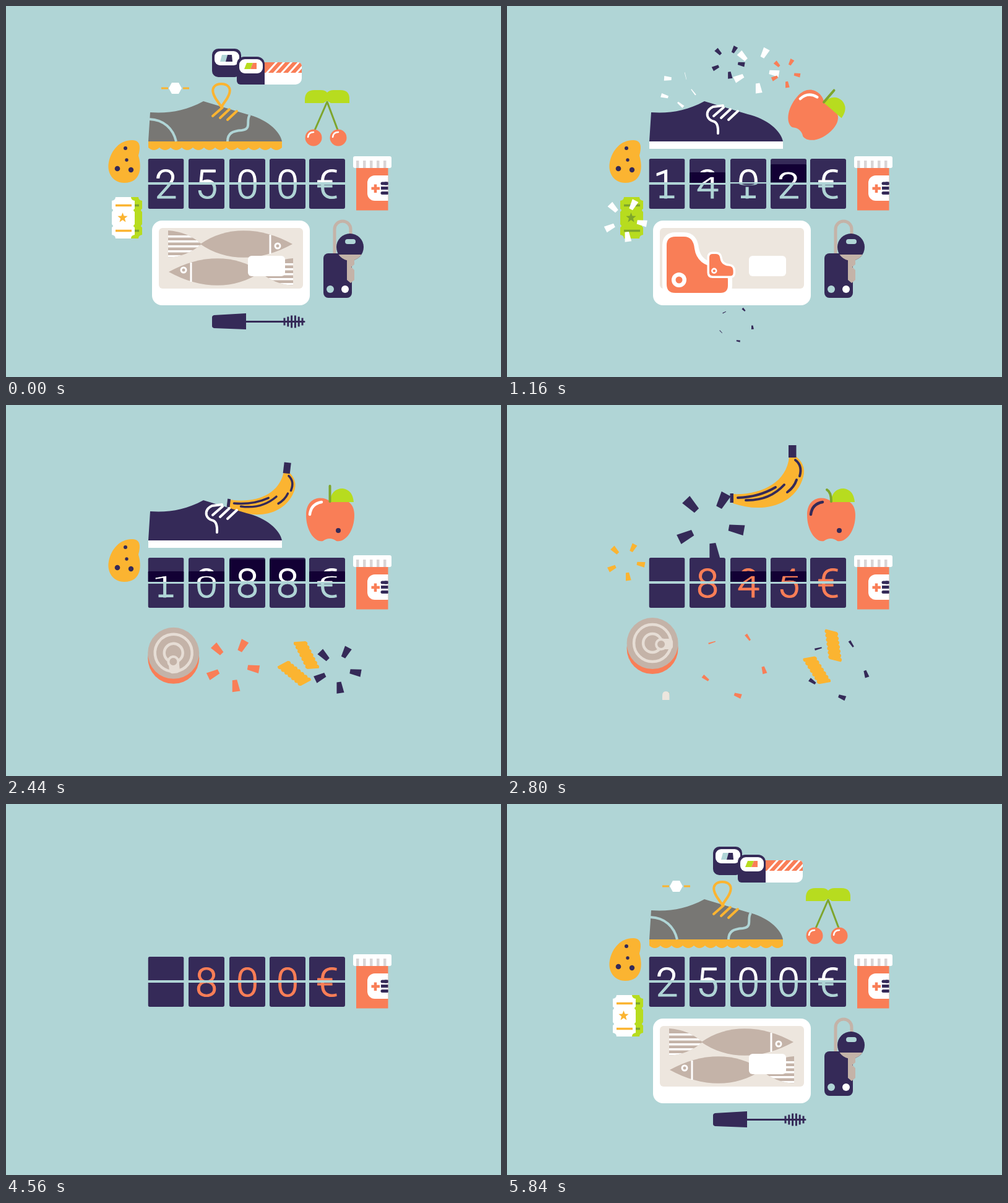
Write an HTML page with a canvas that moves like this. It is 800 px wide and 600 px high and loops after 6040 ms.

```html
<!DOCTYPE html>
<html lang="en">
<head>
<meta charset="utf-8">
<title>Budget counter</title>
<style>
  html, body { margin: 0; width: 100%; height: 100%; overflow: hidden; background: #b0d5d6; }
  canvas { display: block; width: 800px; height: 600px; }
</style>
</head>
<body>
<canvas id="stage" width="800" height="600"></canvas>
<script>
const ctx = document.getElementById('stage').getContext('2d');
const LOOP = 6040, TAU = Math.PI * 2;
const SKY = '#b0d5d6', NAVY = '#352a58', DARK = '#120034', ORANGE = '#f97e57', YELLOW = '#fbb431',
  WHITE = '#fff', LIME = '#b7dc1f', GREEN = '#7ea52c', CREAM = '#ede6de', TAUPE = '#c4b3a8', GRAY = '#787774';

// Timing
const lerp = (a, b, k) => a + (b - a) * k;
const prog = (t, start, dur) => Math.min(1, Math.max(0, (t - start) / dur));
const easeOut = (p, n = 3) => 1 - (1 - p) ** n;
const back = p => 1 - 2 * (1 - p) ** 3 + (1 - p) ** 2;

// Visibility from 0 to 1; items that enter after they leave span the loop seam.
function presence(t, enter, leave, outDur = 280) {
  const entering = enter < leave ? t < leave : t >= enter;
  return entering ? back(prog(t, enter, 400)) : 1 - prog(t, leave, outDur) ** 2;
}

// Drawing helpers
function fill(color, d) { ctx.fillStyle = color; ctx.fill(new Path2D(d)); }
function line(color, width, d, cap = 'round') {
  ctx.strokeStyle = color; ctx.lineWidth = width; ctx.lineCap = cap; ctx.lineJoin = 'round';
  ctx.stroke(new Path2D(d));
}
function disc(color, x, y, r) {
  ctx.fillStyle = color; ctx.beginPath(); ctx.arc(x, y, r, 0, TAU); ctx.fill();
}
function ring(color, x, y, r, width) {
  ctx.strokeStyle = color; ctx.lineWidth = width;
  ctx.beginPath(); ctx.arc(x, y, r, 0, TAU); ctx.stroke();
}
function box(color, x, y, w, h, r = 0) {
  ctx.fillStyle = color; ctx.beginPath(); ctx.roundRect(x, y, w, h, r); ctx.fill();
}
function scoped(draw) { ctx.save(); draw(); ctx.restore(); }
function clipBox(x, y, w, h, r = 0) { ctx.beginPath(); ctx.roundRect(x, y, w, h, r); ctx.clip(); }

// Moves an item between a hiding place (k = 0) and its own centre (k = 1).
function tuck(k, [cx, cy], [hx, hy], draw, small = 0.6, turn = 0) {
  if (k <= 0) return;
  scoped(() => {
    ctx.translate(lerp(hx, cx, k), lerp(hy, cy, k));
    ctx.rotate(turn * (1 - k));
    const s = lerp(small, 1, k);
    ctx.scale(s, s);
    ctx.translate(-cx, -cy);
    draw();
  });
}

function burst(t, start, x, y, reach, size, color) {
  const p = (t - start) / 600;
  if (p <= 0 || p >= 1) return;
  const r = reach * easeOut(p, 4), s = size * Math.sqrt(1 - p ** 3) * Math.min(1, p * 6);
  for (let i = 0; i < 5; i++) {
    scoped(() => {
      ctx.translate(x, y);
      ctx.rotate((i * 72 - 62) * Math.PI / 180);
      ctx.translate(r, 0);
      ctx.rotate(Math.max(0, p - 0.3) * (i % 2 ? 2 : -2));
      ctx.scale(s, s * Math.max(0.1, Math.abs(Math.cos(Math.max(0, p - 0.3) * (4 + i)))));
      fill(color, 'M-.5-.2L.5-.34V.34L-.5.2Z');
    });
  }
}

// Items
const SHOE = 'M233 172C262 174 290 170 319 154L389 175C420 182 443 202 446 219H230Z';
const LACES = 'M334 178L350 164M346 181L361 167M358 184L373 170';

function oldShoe() {
  fill(YELLOW, 'M230 219H446V229' + 'q-9 8-18 0'.repeat(12) + 'Z');
  fill(GRAY, SHOE);
  line(SKY, 4, 'M232 183C255 184 270 198 275 219M394 176C387 186 398 199 381 201C366 202 358 206 358 219', 'butt');
  line(YELLOW, 4, 'M348 163L339 150C327 130 341 126 348 126S369 130 357 150Z' + LACES);
}
function newShoe() {
  fill(NAVY, SHOE);
  box(WHITE, 230, 219, 216, 12);
  line(WHITE, 4, 'M349 161L333 163Q322 168 324 178Q326 185 335 187Q342 190 341 206' + LACES);
}
function sushi() {
  box(NAVY, 333, 69, 47, 46, 10);
  box(WHITE, 337, 73, 40, 23, 9);
  fill(SKY, 'M349 79H358L355 90H346Z');
  fill(NAVY, 'M358 79H365L366 90H355Z');
  box(WHITE, 410, 91, 68, 36, [0, 6, 10, 0]);
  scoped(() => {
    clipBox(416, 91, 62, 17, [0, 6, 0, 0]);
    box(ORANGE, 416, 91, 62, 17);
    for (let x = 420; x < 490; x += 12) line(WHITE, 3, `M${x} 110L${x + 19} 89`);
  });
  box(NAVY, 373, 82, 45, 45, [12, 12, 0, 6]);
  box(WHITE, 377, 86, 38, 23, 9);
  fill(LIME, 'M389 92H399L395 102H385Z');
  fill(ORANGE, 'M399 92H405V102H395Z');
}
function jewel() {
  line(YELLOW, 3, 'M251 133H262M286 133H296', 'butt');
  fill(WHITE, 'M268 124H279L284 133L279 142H268L263 133Z');
}
function cherries() {
  line(GREEN, 3, 'M498 203L519 155L537 203');
  fill(LIME, 'M483 157V150Q484 136 498 136H509Q516 136 519 140Q523 136 529 136H541Q555 136 555 150V157H525L519 153L513 157Z');
  for (const x of [497, 537]) {
    disc(ORANGE, x, 213, 13.5);
    line(WHITE, 2.5, `M${x - 9} 212Q${x - 8} 204 ${x} 204`);
  }
}
function apple(t) {
  fill(ORANGE, 'M524 156C512 146 485 148 485 178C485 204 500 223 512 220Q523 212 534 220C548 223 563 204 563 178C563 157 548 148 524 156Z');
  fill(LIME, 'M523 157Q526 135 544 135Q560 137 562 157Z');
  const ripe = t > 2600;
  line(GREEN, 4, ripe ? 'M524 156Q524 141 517 137' : 'M523.5 156V131');
  line(ripe ? NAVY : WHITE, 4.5, 'M491 177Q493 160 510 157');
  if (t > 2000) disc(NAVY, 537, 203, 4);
}
function potato() {
  fill(YELLOW, 'M203 217C219 216 217 231 214 242C219 258 220 286 191 286C172 286 163 269 166 253C170 232 185 217 203 217Z');
  for (const [x, y, r] of [[193, 230, 3], [195, 249, 2.7], [180, 263, 4.3], [202, 265, 4.2]]) disc(NAVY, x, y, r);
}
function ticket(x, paper, ink) {
  scoped(() => {
    ctx.translate(x, 309);
    fill(paper, 'M6 0H31Q31 5 37 6V19Q33 21 37 24V44Q33 47 37 49V61Q31 62 31 67H6Q6 62 0 61V49Q4 47 0 44V24Q4 21 0 19V6Q6 5 6 0Z');
    line(ink, 3.5, 'M6 13.5H32M6 54.5H32', 'butt');
    let d = '';
    for (let i = 0; i < 10; i++) {
      const a = i * Math.PI / 5 - Math.PI / 2, r = i % 2 ? 3.6 : 8.5;
      d += `${i ? 'L' : 'M'}${17.5 + r * Math.cos(a)} ${33.5 + r * Math.sin(a)}`;
    }
    fill(ink, d + 'Z');
  });
}
function keys() {
  line(TAUPE, 5, 'M531 402V361A13 13 0 0 1 557 361V384', 'butt');
  box(NAVY, 513, 400, 46, 72, 8);
  disc(SKY, 524, 458, 6);
  disc(WHITE, 548, 458, 6);
  disc(NAVY, 556, 390, 22);
  scoped(() => { clipBox(530, 402, 52, 20); disc(TAUPE, 556, 390, 22); });
  fill(TAUPE, 'M551 410H563V418L558 422L563 427V443L557 448L551 443Z');
  box(SKY, 548, 377, 17, 8, 4);
}
function mascara() {
  fill(NAVY, 'M336 500L388 497V523L336 521Q333 520 333 518V503Q333 501 336 500Z');
  line(NAVY, 3, 'M388 510.5H482');
  for (let i = 0; i < 6; i++) {
    const h = [6, 8, 10, 10, 8, 6][i], x = 450 + i * 5.8;
    line(NAVY, 3, `M${x} ${510.5 - h}V${510.5 + h}`, 'butt');
  }
}
function fish(x, y, flip) {
  scoped(() => {
    ctx.translate(x, y);
    ctx.scale(flip, 1);
    scoped(() => {
      ctx.clip(new Path2D('M-101-22Q-70-20-47 0Q-70 20-101 22Z'));
      box(TAUPE, -101, -22, 60, 44);
      for (let k = -14; k < 22; k += 8) box(WHITE, -101, k, 60, 3.5);
    });
    fill(TAUPE, 'M-49 0C-8-29 48-29 100 0C48 29-8 29-49 0Z');
    line(WHITE, 3, 'M64-15V16', 'butt');
    disc(WHITE, 76, 3 * flip, 5.5);
    disc(TAUPE, 76, 3 * flip, 2.5);
  });
}
function steak(x, y, s, rim) {
  const d = 'M14 0H28Q43 0 45 19Q49 47 82 50Q99 52 99 70V79Q99 91 87 91H14Q0 91 0 77V14Q0 0 14 0Z';
  scoped(() => {
    ctx.translate(x, y);
    ctx.scale(s, s);
    line(WHITE, rim, d);
    fill(ORANGE, d);
    disc(WHITE, 20, 70, 12);
    disc(ORANGE, 20, 70, 5.5);
  });
}
function tray(t) {
  const shrink = prog(t, 2080, 200);
  if (shrink >= 1 && t < 4940) return;
  const again = t >= 4940;
  const k = again ? back(prog(t, 4940, 400)) : 1;
  const swap = again ? 0 : easeOut(prog(t, 400, 240));
  scoped(() => {
    if (again) {
      clipBox(0, 300, 800, 300);
      ctx.translate(0, -152 * (1 - k));
    } else {
      const s = 1 - shrink ** 2;
      ctx.translate(374, 449);
      ctx.scale(s, s);
      ctx.translate(-374, -449);
    }
    box(WHITE, 236, 347, 255, 137, 16);
    scoped(() => {
      clipBox(247, 359, 233, 98, 6);
      box(CREAM, 247, 359, 233, 98);
      if (swap < 1) {
        const dy = 110 * swap + 102 * (1 - k);
        fish(363, 385 + dy, 1);
        fish(363, 430 + dy, -1);
      }
    });
    if (swap > 0) scoped(() => {
      clipBox(247, 359, 233, 112, 6);
      const dy = -125 * (1 - swap);
      steak(258, 373 + dy, 1, 14);
      steak(327, 401 + dy, 0.39, 18);
    });
    box(WHITE, 391, 404, 60, 33, 6);
  });
}
function can(turn) {
  disc(ORANGE, 235, 393.5, 41.5);
  disc(TAUPE, 235, 385.5, 41.5);
  scoped(() => {
    ctx.translate(235, 385);
    ctx.rotate(turn);
    ring('#e6ddd5', 0, 0, 30, 4.5);
    ring('#e6ddd5', 0, 0, 15, 4.5);
    box('#e6ddd5', 12, -7, 21, 17, 5);
    disc(TAUPE, 14, 2, 8);
    ring('#e6ddd5', 14, 2, 8, 4);
  });
}
function pasta(x, y, deg) {
  scoped(() => {
    ctx.translate(x, y);
    ctx.rotate(deg * Math.PI / 180);
    fill(YELLOW, 'M-29 8' + 'q3.5 4 7 0'.repeat(7) + 'L27-9' + 'q-3.5-4-7 0'.repeat(7) + 'Z');
  });
}
function banana() {
  fill(YELLOW, 'M456 84H468Q486 99 477 122C462 162 414 176 365 159V144C410 146 452 126 456 84Z');
  box(NAVY, 455, 65, 12.5, 20);
  box(NAVY, 360.5, 143, 5.5, 15);
  line(NAVY, 4, 'M373 150Q407 149 434 133M386 154Q424 155 448 129M453 141Q464 133 468 121M466 89Q478 98 473 115');
}
function receipt(t) {
  const open = easeOut(prog(t, 2740, 520), 2);
  clipBox(245, 380, lerp(0, 130, prog(open, 0.1, 0.9)), 120);
  fill(CREAM, 'M293 389' + 'l4-3l4 3'.repeat(9) + 'l4-2V477Q369 495 351 495H278Q293 490 293 470Z');
  fill('#bec8b8', 'M257 464H294V478Q292 495 278 495Q263 494 263 478Q263 469 257 464Z');
  fill(CREAM, 'M251 477V470Q251 463 257 463Q263 464 263 470V477Z');
  line(NAVY, 5, 'M327 405H339M323 413.5H343M300.5 431H314M300.5 443H321M300.5 456H314M300.5 468H311'
    + 'M349.5 431H360M349.5 443H360M354.5 456H360M349.5 468H360');
}
function medicine() {
  box(ORANGE, 566, 258, 51.5, 72.5);
  box(WHITE, 561, 243, 62, 19, 3);
  for (let x = 566; x < 620; x += 11) box('#d9d5d6', x, 250, 4.5, 12);
  box(WHITE, 584, 274, 33.5, 41, [12, 0, 0, 12]);
  line(ORANGE, 4.5, 'M590.5 295H604M597 288.5V302', 'butt');
  line(NAVY, 5, 'M608 287H615M608 302.5H615');
  line(NAVY, 5, 'M606 294.5H617.5', 'butt');
  box(NAVY, 612, 284.5, 5.5, 5);
  box(NAVY, 612, 300, 5.5, 5);
}

// Flip counter
const FLIP = 200;
const tiles = [
  { x: 258.5, text: '21 2', at: [600, 2371, 4835] },
  { x: 324, text: '530943210885', at: [100, 340, 580, 820, 1091, 1400, 1760, 2080, 2371, 2571, 4935] },
  { x: 390, text: '074910639840200', at: [60, 300, 540, 790, 1052, 1300, 1540, 1800, 2080, 2420, 2731, 3000, 3250, 5025] },
  { x: 455, text: '0628121749854700', at: [40, 240, 440, 660, 890, 1118, 1340, 1580, 1840, 2100, 2420, 2731, 2960, 3360, 5125] },
  { x: 519, text: '€€€€', at: [2371, 2571, 5225] }
];

function half(x, top, face, squash = 1, color = NAVY) {
  scoped(() => {
    ctx.translate(x, 287);
    ctx.scale(1, squash);
    clipBox(-29, top ? -40 : 2, 58, top ? 38 : 39, top ? [3, 3, 0, 0] : [0, 0, 3, 3]);
    ctx.fillStyle = color;
    ctx.fillRect(-29, -40, 58, 81);
    ctx.fillStyle = ctx.strokeStyle = face.orange ? ORANGE : top ? WHITE : SKY;
    ctx.lineWidth = 1.2;
    const one = face.char === '1';
    ctx.fillText(face.char, one ? -4 : 0, 23.5);
    ctx.strokeText(face.char, one ? -4 : 0, 23.5);
    if (one) ctx.fillRect(-12, 19.5, 24, 4.5);
  });
}
function counter(t) {
  ctx.fillStyle = SKY;
  ctx.fillRect(229, 247, 319, 81);
  ctx.font = '300 65px Roboto, sans-serif';
  ctx.textAlign = 'center';
  for (const { x, text, at } of tiles) {
    const n = at.filter(s => s <= t).length;
    const face = i => ({ char: text[i], orange: i > 0 && at[i - 1] > 2400 && at[i - 1] < 4700 });
    const next = face(n), last = face(Math.max(0, n - 1));
    const p = n ? prog(t, at[n - 1], FLIP) : 1;
    const tilt = Math.cos(p * Math.PI);
    half(x, true, next);
    half(x, false, p < 1 ? last : next);
    if (p < 0.5) half(x, true, last, Math.max(0.01, tilt), p > 0.05 ? DARK : NAVY);
    else if (p < 1) half(x, false, next, Math.max(0.01, -tilt));
  }
}

function scene(t) {
  ctx.fillStyle = SKY;
  ctx.fillRect(0, 0, 800, 600);

  // Above the counter
  tuck(presence(t, 5300, 1010, 1), [406, 98], [390, 190], sushi);
  tuck(presence(t, 5380, 760, 1), [274, 133], [274, 200], jewel);
  const bananaIn = t < 3960;
  tuck(presence(t, 2340, 3960, 340), [420, 115], bananaIn ? [397, 180] : [420, 287], banana, 0.6, bananaIn ? 0.42 : 0);
  tuck(presence(t, 4940, 680, 240), [519, 181], [519, 300], cherries, 0.65);
  if (t > 1040 && t < 4500) {
    const rest = 1 - easeOut(prog(t, 1040, 400));
    const leave = 1 - prog(t, 4040, 340) ** 2;
    scoped(() => {
      const s = Math.min(1, (1 - rest) * 1.6);
      ctx.translate(524 - 80 * rest, 180 - 18 * rest);
      ctx.rotate(2.1 * rest);
      ctx.scale(s, s);
      ctx.translate(-524, -180);
      tuck(leave, [524, 180], [519, 287], () => apple(t));
    });
  }
  tuck(presence(t, 4940, 40), [338, 187], [338, 289], oldShoe, 0.74);
  tuck(presence(t, 320, 2660, 1), [338, 187], [338, 289], newShoe, 0.74);

  // Beside the counter
  tuck(presence(t, 5300, 2650, 1), [191, 252], [258, 287], potato);
  const slide = t < 5000 ? 1 : back(prog(t, 5300, 400));
  if (t < 1400 || t > 5300) ticket(171 + 12 * slide, LIME, GREEN);
  tuck(presence(t, 4940, 1010, 1), [189, 343], [239, 322], () => ticket(171, WHITE, YELLOW), 1);
  medicine();

  // Below the counter
  tuck(presence(t, 5320, 600, 1), [408, 511], [380, 465], mascara);
  tray(t);
  tuck(presence(t, 4940, 2300, 1), [536, 436], [522, 275], keys, 0.4);
  if (t > 2260 && t < 4600) {
    const rest = 1 - easeOut(prog(t, 2260, 640), 4);
    const grow = Math.min(1, prog(t, 2260, 100));
    const fly = (x, y, draw) => scoped(() => {
      ctx.translate((370 - x) * rest + x, (449 - y) * rest + y);
      ctx.scale(grow, grow);
      ctx.translate(-x, -y);
      draw();
    });
    const gone = start => 1 - prog(t, start, 340) ** 2;
    tuck(gone(4080), [235, 389], [280, 287], () => fly(235, 389, () => can(5.5 * rest)));
    tuck(gone(4140), [514, 408], [490, 287], () => {
      fly(527, 390, () => pasta(527, 390, 82 - 70 * rest));
      fly(501, 430, () => pasta(501, 430, 58 - 70 * rest));
    });
    if (t > 2740) tuck(gone(4200), [310, 440], [320, 287], () => receipt(t));
  }

  burst(t, 600, 370, 515, 27, 14, NAVY);
  burst(t, 760, 277, 135, 25, 14, WHITE);
  burst(t, 1010, 357, 90, 32, 11, NAVY);
  burst(t, 1010, 402, 103, 44, 16, WHITE);
  burst(t, 1010, 450, 108, 28, 10, ORANGE);
  burst(t, 1010, 191, 346, 40, 16, WHITE);
  burst(t, 1400, 201, 343, 40, 16, LIME);
  burst(t, 2290, 366, 420, 50, 19, ORANGE);
  burst(t, 2300, 535, 427, 46, 18, NAVY);
  burst(t, 2650, 192, 253, 36, 13, YELLOW);
  burst(t, 2660, 328, 193, 66, 25, NAVY);

  counter(t);
}

function frame() {
  scene(performance.now() % LOOP);
  requestAnimationFrame(frame);
}
frame();
</script>
</body>
</html>
```
